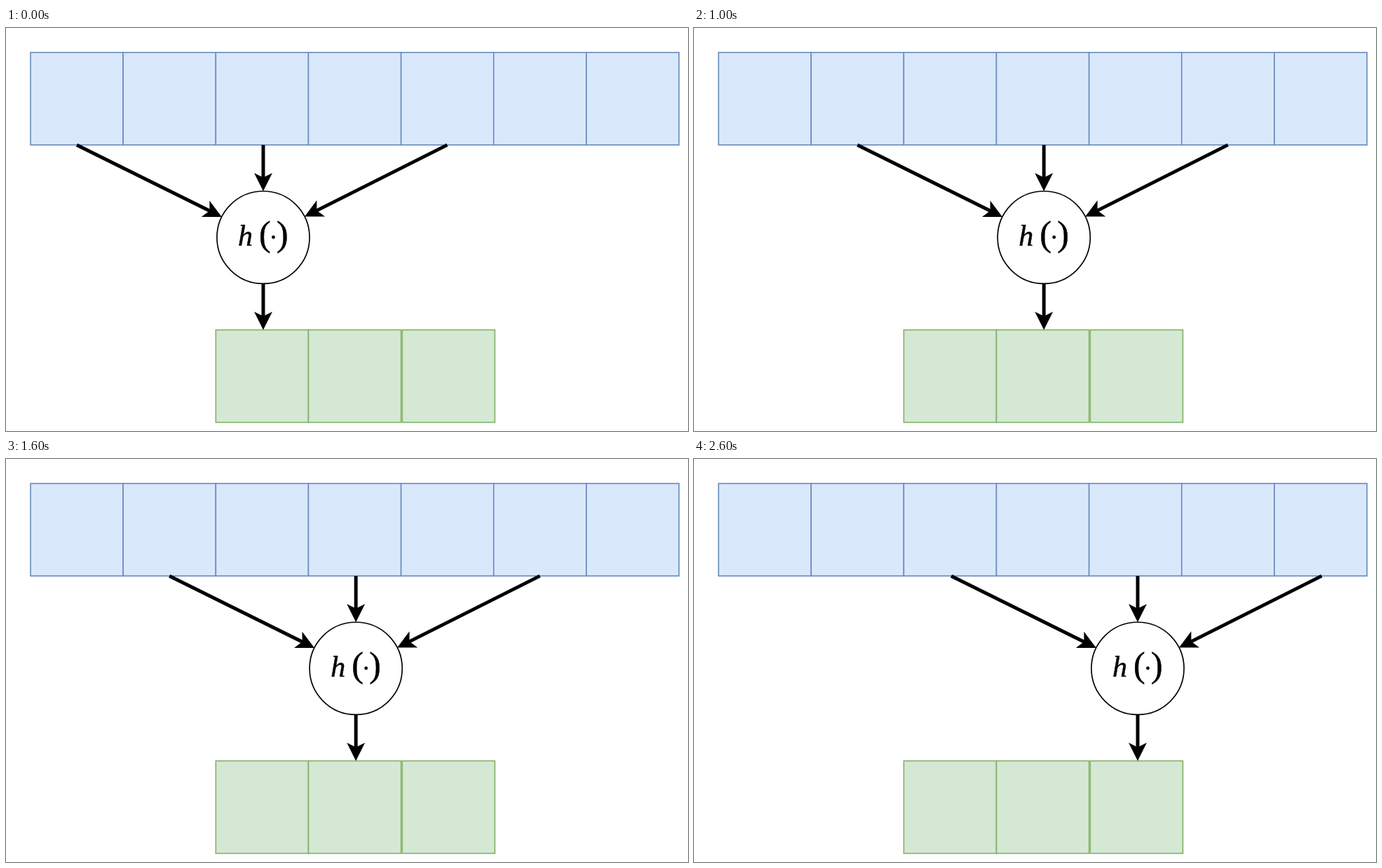
Animation of 973x576 px, one loop 3000 ms. Source, as an HTML page with a canvas:

```html
<!DOCTYPE html>
<html lang="en">
<head>
<meta charset="utf-8">
<title>Sliding hash window</title>
<style>
  html, body { margin: 0; width: 100%; height: 100%; overflow: hidden; background: #fff; }
  canvas { display: block; }
</style>
</head>
<body>
<canvas id="stage" width="973" height="576"></canvas>
<script>
const ctx = document.getElementById('stage').getContext('2d');
const UNIT = 1.652;
const CELL = 80 * UNIT;
const RADIUS = CELL / 2;
const THIN = UNIT;
const THICK = 3 * UNIT;
const TOP = 35, LEFT = 35;
const CENTER_Y = TOP + 2 * CELL;
const CENTERS = [367, 499.2, 633];
const STEP_MS = 1000;

function cell(x, y, fill, stroke) {
  ctx.fillStyle = fill;
  ctx.strokeStyle = stroke;
  ctx.lineWidth = THIN;
  ctx.fillRect(x, y, CELL, CELL);
  ctx.strokeRect(x, y, CELL, CELL);
}

function arrow(x1, y1, x2, y2) {
  const head = 9 * UNIT;
  const inset = THICK * 1.118; // room for the mitred tip
  ctx.save();
  ctx.translate(x2, y2);
  ctx.rotate(Math.atan2(y2 - y1, x2 - x1));
  ctx.lineWidth = THICK;
  ctx.beginPath();
  ctx.moveTo(-Math.hypot(x2 - x1, y2 - y1), 0);
  ctx.lineTo(-inset - head * 0.75, 0);
  ctx.stroke();
  ctx.beginPath();
  ctx.moveTo(-inset, 0);
  ctx.lineTo(-inset - head, -head / 2);
  ctx.lineTo(-inset - head * 0.75, 0);
  ctx.lineTo(-inset - head, head / 2);
  ctx.closePath();
  ctx.fill();
  ctx.stroke();
  ctx.restore();
}

function arrowToCircle(x, y, cx) {
  const angle = Math.atan2(y - CENTER_Y, x - cx);
  arrow(x, y, cx + RADIUS * Math.cos(angle), CENTER_Y + RADIUS * Math.sin(angle));
}

function glyph(char, font, x, y) {
  ctx.font = font + ' "Liberation Serif", serif';
  ctx.lineWidth = 0.5;
  ctx.fillText(char, x, y);
  ctx.strokeText(char, x, y);
}

function hashNode(cx) {
  ctx.lineWidth = THIN;
  ctx.beginPath();
  ctx.arc(cx, CENTER_Y, RADIUS, 0, 2 * Math.PI);
  ctx.stroke();

  glyph('h', 'italic 42px', cx - 36, 311);
  glyph('(', '50px', cx - 6, 311);
  glyph(')', '50px', cx + 19, 311);
  ctx.beginPath();
  ctx.arc(cx + 14.5, 299, 2.4, 0, 2 * Math.PI);
  ctx.fill();
}

function draw(time) {
  const cx = CENTERS[Math.floor(time / STEP_MS) % CENTERS.length];
  const inputBottom = TOP + CELL;
  const outputTop = TOP + 3 * CELL;

  ctx.fillStyle = '#fff';
  ctx.fillRect(0, 0, 973, 576);
  for (let i = 0; i < 7; i++) cell(LEFT + i * CELL, TOP, '#dae8fc', '#6c8ebf');
  for (let i = 0; i < 3; i++) {
    const gap = i === 2 ? UNIT : 0;
    cell(LEFT + (i + 2) * CELL + gap, outputTop, '#d5e8d4', '#82b366');
  }

  ctx.fillStyle = ctx.strokeStyle = '#000';
  arrowToCircle(cx - 266, inputBottom, cx);
  arrowToCircle(cx, inputBottom, cx);
  arrowToCircle(cx + 262.5, inputBottom, cx);
  arrow(cx, CENTER_Y + RADIUS, cx, outputTop);
  hashNode(cx);
}

const start = performance.now();
function tick() {
  draw(performance.now() - start);
  requestAnimationFrame(tick);
}
tick();
</script>
</body>
</html>
```
